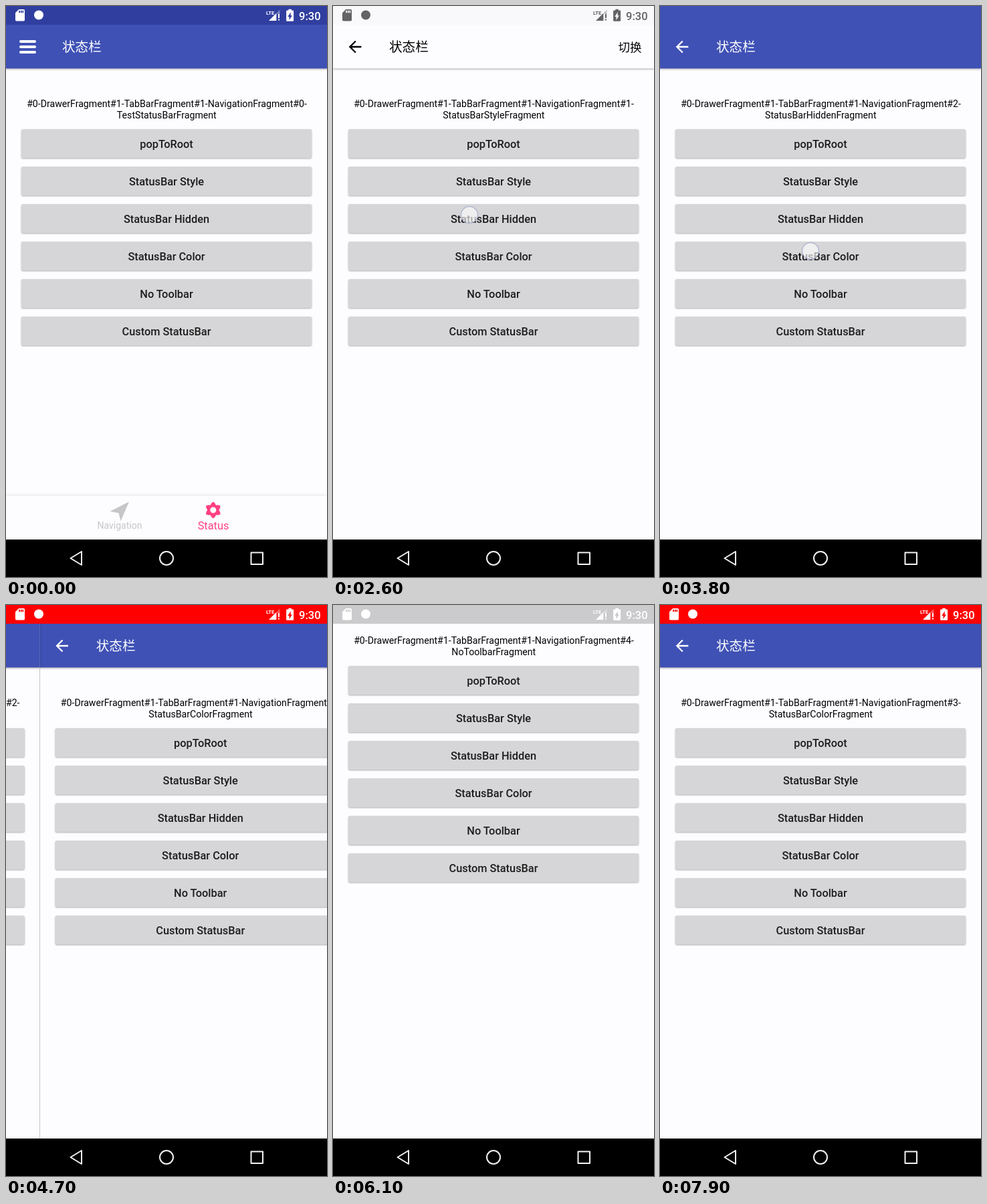
Animation, 480 px wide and 853 px high, one loop 8 s. Source, as an HTML page:

```html
<!DOCTYPE html>
<html lang="zh">
<head>
<meta charset="utf-8">
<style>
html, body { margin: 0; width: 100%; height: 100%; overflow: hidden; background: #000; }
svg { display: block; width: 480px; height: 853px; font-family: Roboto, sans-serif; }
.bar { filter: drop-shadow(0 1px 1.5px rgba(0,0,0,.35)); }
.button rect { fill: #d6d5d7; filter: drop-shadow(0 1px 1px rgba(0,0,0,.32)); }
.button.pressed rect { filter: drop-shadow(0 2px 2.5px rgba(0,0,0,.42)); }
.button text { font-size: 16.33px; font-weight: 500; fill: #1d1d1e; }
.path { font-size: 14.13px; }
.cjk { font-family: "Noto Sans CJK SC", "Noto Sans CJK", sans-serif; }
.tabs { filter: drop-shadow(0 0 2.5px rgba(0,0,0,.16)); }
.mid { text-anchor: middle; }
</style>
</head>
<body>
<svg viewBox="0 0 480 853">
  <g id="screens"></g>
  <rect id="statusBg" width="480" height="28"/>
  <g id="status">
    <path transform="translate(10.5 3.2) scale(.875)" fill-rule="evenodd" d="M18 2h-8L4 8v12c0 1.1.9 2 2 2h12c1.1 0 2-.9 2-2V4c0-1.1-.9-2-2-2zm-6 6h-2V4h2zm3 0h-2V4h2zm3 0h-2V4h2z"/>
    <circle cx="49" cy="13.5" r="7"/>
    <text x="389" y="13" font-size="7.5" font-weight="700">LTE</text>
    <path d="M393 22L404 11V22z"/>
    <path d="M404 11L409.500 5.500V12H405V22H404z" opacity=".35"/>
    <path d="M407 12h2v6h-2zM407 19.500h2v2h-2z"/>
    <path transform="translate(411.4 3) scale(1.1 .9)" fill-rule="evenodd" d="M15.700 4H14V2h-4v2H8.300C7.600 4 7 4.600 7 5.300v15.400C7 21.400 7.600 22 8.300 22h7.400c.7 0 1.300-.6 1.300-1.300V5.300C17 4.600 16.400 4 15.700 4zM11 20v-5.500H9L13 7v5.500h2z"/>
    <text x="438" y="20.600" font-size="16.500" font-weight="500">9:30</text>
  </g>
  <rect y="797" width="480" height="56"/>
  <ellipse id="ripple" cx="105" cy="825" rx="44" ry="26" fill="#fff" opacity="0"/>
  <g fill="none" stroke="#f2f2f2" stroke-width="2" stroke-linejoin="round">
    <path d="M113 815L96.500 825L113 835z"/>
    <circle cx="240" cy="825" r="10"/>
    <rect x="366.500" y="816.500" width="17.500" height="17.500"/>
  </g>
  <circle id="dot" r="12.500" fill="#fff" fill-opacity=".62" stroke="#a4abcb" stroke-opacity=".75" stroke-width="1.500"/>
</svg>
<script>
const $ = id => document.getElementById(id);
const BLUE = '#3f51b5', PAGE = '#fdfcff';
const labels = ['popToRoot', 'StatusBar Style', 'StatusBar Hidden', 'StatusBar Color', 'No Toolbar', 'Custom StatusBar'];

// status: r, g, b, a of the status bar; icons: fill and opacity
const white = ['#fff', 1], dark = ['#000', .6];
const screens = [
  { name: 'TestStatusBar', bar: BLUE, ink: '#fff', status: [48, 63, 159, 1], icons: white, root: true },
  { name: 'StatusBarStyle', bar: PAGE, ink: '#000', status: [0, 0, 0, .015], icons: dark, action: '切换' },
  { name: 'StatusBarHidden', bar: BLUE, ink: '#fff', status: [0, 0, 0, 0], icons: ['#fff', 0] },
  { name: 'StatusBarColor', bar: BLUE, ink: '#fff', status: [255, 0, 0, 1], icons: white },
  { name: 'NoToolbar', status: [0, 0, 0, .2], icons: white }
];

// start time, from screen, to screen
const moves = [[-1e4, 0, 0], [1726, 0, 1], [3080, 1, 2], [4480, 2, 3], [5751, 3, 4], [7300, 4, 3]];
// time, x, y, screen, button
const taps = [[1200, 182, 265, 0, 1], [2600, 204, 312, 1, 2], [3800, 225, 366, 2, 3], [5300, 233, 423, 3, 4], [7100, 105, 826]];

function toolbar({ bar, ink, root, action }) {
  if (!bar) return '';
  const icon = root
    ? '<path d="M22 53H43M22 61H43M22 69H43" stroke="#fff" stroke-width="4" stroke-linecap="round"/>'
    : '<path transform="translate(19 47) scale(1.1667)" d="M20 11H7.830l5.590-5.590L12 4l-8 8 8 8 1.410-1.410L7.830 13H20z"/>';
  return `<rect class="bar" width="480" height="93.300" fill="${bar}"/>
    <g fill="${ink}">${icon}<text class="cjk" x="84" y="68" font-size="19.600">状态栏</text>
    ${action ? `<text class="cjk" x="426.500" y="67.500" font-size="17.500">${action}</text>` : ''}</g>`;
}

function tabs() {
  const petals = [0, 60, 120, 180, 240, 300].map(a =>
    `<path transform="rotate(${a})" d="M-4.500 -5.500Q-4 -10 0 -12.500Q4 -10 4.500 -5.500z"/>`).join('');
  return `<rect class="tabs" y="731.500" width="480" height="65.500" fill="${PAGE}"/>
    <g class="mid" fill="#c6c5c7"><path d="M184 740.500L155.500 755L168.500 757.500L171.500 769.500z"/>
      <text x="170" y="781" font-size="14">Navigation</text></g>
    <g class="mid" fill="#ff4081"><g transform="translate(309.800 753)">${petals}
      <circle r="6.300" fill="none" stroke="#ff4081" stroke-width="3.600"/></g>
      <text x="310" y="781.500" font-size="16.330">Status</text></g>`;
}

function page(s, i) {
  const buttons = labels.map((label, k) =>
    `<g class="button" transform="translate(0 ${184 + 56 * k})"><rect x="23" width="434" height="43" rx="2.300"/>
    <text x="240" y="27.700">${label}</text></g>`).join('');
  return `<g id="page${i}"><rect width="480" height="797" fill="${PAGE}"/>${toolbar(s)}
    <g class="mid" transform="translate(0 ${s.bar ? 0 : -93})">
      <text class="path" x="240.500" y="151">#0-DrawerFragment#1-TabBarFragment#1-NavigationFragment#${i}-</text>
      <text class="path" x="240.300" y="168">${s.name}Fragment</text>${buttons}</g>
    ${s.root ? tabs() : ''}</g>`;
}

$('screens').innerHTML = screens.map(page).reverse().join('');
const pages = screens.map((s, i) => $('page' + i));
const clamp = v => Math.min(1, Math.max(0, v));
const ease = v => (1 - Math.cos(Math.PI * clamp(v))) / 2;
const last = (list, t) => list.filter(item => item[0] <= t).pop();

function draw(now) {
  const t = now % 8000;
  const [start, from, to] = last(moves, t);
  const p = ease((t - start) / 280), dir = Math.sign(to - from);
  pages.forEach((el, i) => {
    const shown = i === to || (i === from && p < 1);
    const x = i === to ? 480 * dir * (1 - p) : -480 * dir * p;
    el.setAttribute('visibility', shown ? 'visible' : 'hidden');
    el.setAttribute('transform', `translate(${x} 0)`);
  });

  const q = ease((t - start) / 200);
  const color = screens[from].status.map((v, k) => v + (screens[to].status[k] - v) * q);
  $('statusBg').setAttribute('fill', `rgba(${color.slice(0, 3).map(Math.round)},${color[3]})`);
  const [fill, opacity] = screens[to].icons;
  $('status').setAttribute('fill', fill);
  $('status').setAttribute('opacity', opacity);

  document.querySelectorAll('.pressed').forEach(el => el.classList.remove('pressed'));
  const tap = last(taps, t);
  let dot = 0, ripple = 0;
  if (tap) {
    const [t0, x, y, screen, button] = tap, age = t - t0;
    dot = 1 - clamp((age - 200) / 550);
    if (screen === undefined) {
      dot = 1 - clamp((age - 100) / 400);
      ripple = .16 * (1 - clamp(age / 500));
    } else if (age > 100 && age < 700) {
      pages[screen].querySelectorAll('.button')[button].classList.add('pressed');
    }
    $('dot').setAttribute('cx', x);
    $('dot').setAttribute('cy', y);
  }
  $('dot').setAttribute('opacity', dot);
  $('ripple').setAttribute('opacity', ripple);
}

const begin = performance.now();
function tick() {
  draw(performance.now() - begin);
  requestAnimationFrame(tick);
}
tick();
</script>
</body>
</html>
```
